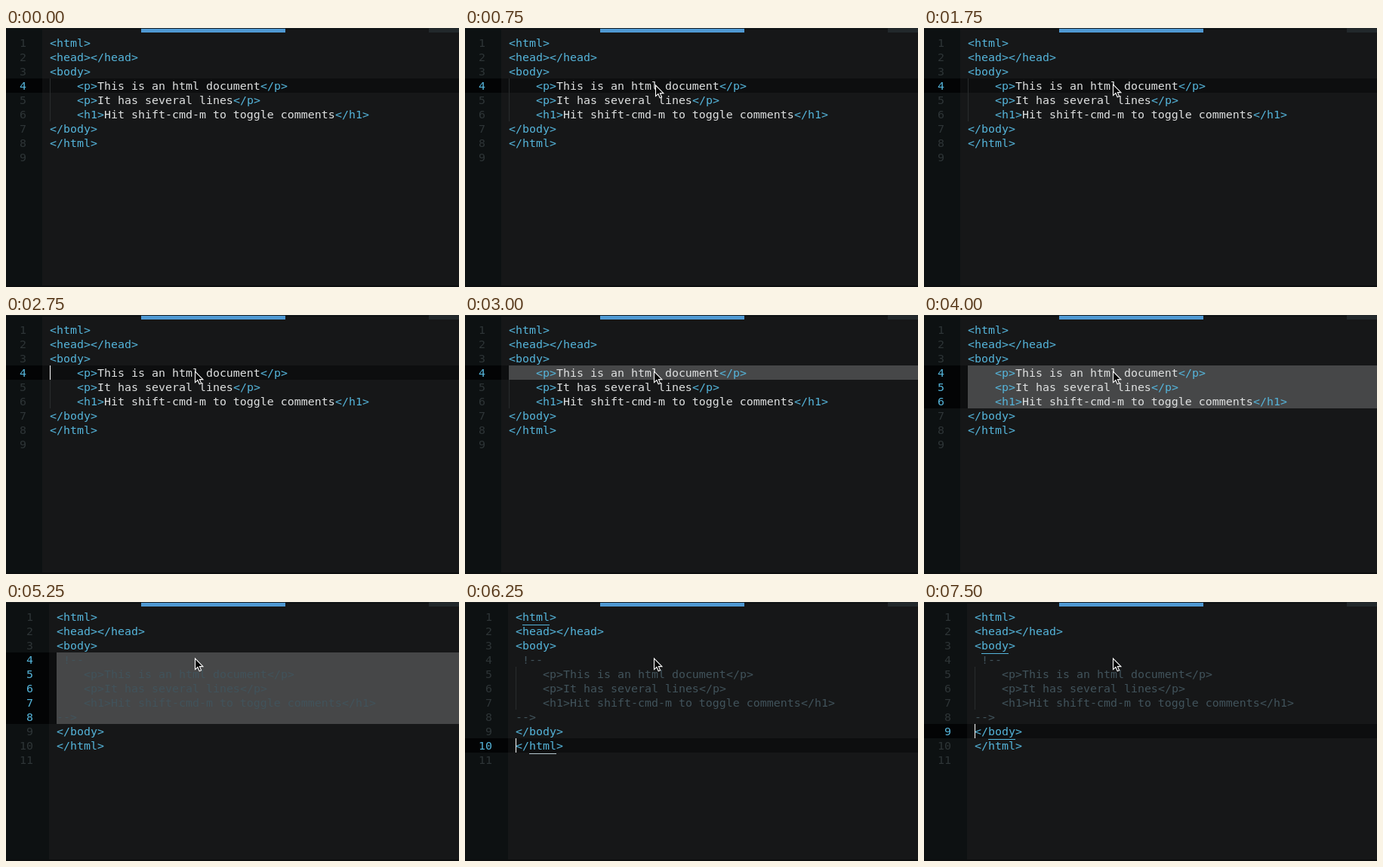
An HTML page with a canvas that plays this animation: 600x344 px, repeating every 8000 ms.

```html
<!DOCTYPE html>
<html lang="en">
<head>
<meta charset="utf-8">
<title>Toggle comments</title>
<style>
  html, body { margin: 0; width: 100%; height: 100%; overflow: hidden; background: #161718; }
  canvas { display: block; }
</style>
</head>
<body>
<canvas width="600" height="344"></canvas>
<script>
const ctx = document.querySelector('canvas').getContext('2d');
const LOOP = 8000, ROW = 19, CHAR = 9, TOP = 10;
const BLUE = '#55b5db', WHITE = '#dfe1e1', COMMENT = '#41535b';

const inner = [
  '    <p>This is an html document</p>',
  '    <p>It has several lines</p>',
  '    <h1>Hit shift-cmd-m to toggle comments</h1>'
];
const head = ['<html>', '<head></head>', '<body>'];
const tail = ['</body>', '</html>', ''];
const plain = [...head, ...inner, ...tail];
const commented = [...head, '<!--', ...inner, '-->', ...tail];

// Mouse positions as [time, x, y]
const mousePath = [[250, 297.5, 43], [500, 262.5, 58], [750, 252.5, 76], [1000, 250.5, 75]];
const arrow = new Path2D('M0 0V14.6L3.4 11.5L5.7 16.8L8.1 15.8L5.9 10.6H10.4Z');

// Times at which the caret toggles; it starts hidden
const blinks = [1250, 1750, 2000, 2500, 2750, 3000, 6250, 6750, 7000];

const rowTop = row => TOP + (row - 1) * ROW;

function box(color, x, y, w, h) {
  ctx.fillStyle = color;
  ctx.fillRect(x, y, w, h);
}

function text(string, x, row, color) {
  ctx.fillStyle = color;
  ctx.fillText(string, x, rowTop(row) + 15);
}

function drawLine(line, row, x, isComment) {
  for (const part of line.matchAll(/<[^>]*>|[^<]+/g)) {
    const color = isComment ? COMMENT : part[0][0] === '<' ? BLUE : WHITE;
    text(part[0], x + part.index * CHAR, row, color);
  }
}

function stateAt(t) {
  if (t < 3000) return { first: 4, last: 4 };
  if (t < 5250) return { first: 4, last: t < 3500 ? 4 : t < 4000 ? 5 : 6, selected: true };
  if (t < 6250) return { first: 4, last: 8, selected: true };
  return t < 7500
    ? { first: 10, last: 10, pair: [1, 10], closeColor: '#b5c6ce' }
    : { first: 9, last: 9, pair: [3, 9], closeColor: BLUE };
}

function draw(t) {
  const isCommented = t >= 5250;
  const lines = isCommented ? commented : plain;
  const gutter = isCommented ? 57 : 48;
  const left = gutter + 10;
  const { first, last, selected, pair, closeColor } = stateAt(t);

  box('#161718', 0, 0, 600, 344);
  box('#0d1112', 0, 0, gutter, 344);

  // Window edges and tabs
  box('#1b2022', 0, 0, 600, 1);
  box('#0b0d0e', 0, 1, 600, 1);
  box('#22282b', 560, 0, 40, 6);
  box('#4f99d3', 179, 1, 191, 5);
  box('#0c0e0f', 0, 342, 600, 2);

  const y = rowTop(first), height = (last - first + 1) * ROW;
  box('#0d0e0f', 0, y, 600, height);
  box('#030405', 0, y, gutter, height);

  lines.forEach((line, i) => {
    if (line[0] === ' ') box('#292c2d', left, rowTop(i + 1), 1, ROW);
  });
  if (selected) box('#464748', left, y, 600 - left, height);

  lines.forEach((line, i) => {
    const row = i + 1;
    const active = row >= first && row <= last;
    const number = String(row);
    text(number, gutter - 21 - number.length * CHAR, row, active ? BLUE : '#2e3537');
    drawLine(line, row, left, isCommented && row >= 4 && row <= 8);
  });

  if (pair) {
    box(BLUE, left + CHAR, rowTop(pair[0]) + 20, 4 * CHAR, 1);
    box(closeColor, left + 2 * CHAR, rowTop(pair[1]) + 20, 4 * CHAR, 1);
  }
  if (blinks.filter(time => t >= time).length % 2) box('#fff', left, y, 1, ROW);

  const mouse = mousePath.filter(([time]) => t >= time).pop();
  if (mouse) {
    ctx.save();
    ctx.translate(mouse[1], mouse[2]);
    ctx.fillStyle = '#000';
    ctx.strokeStyle = '#fff';
    ctx.lineWidth = 1.1;
    ctx.fill(arrow);
    ctx.stroke(arrow);
    ctx.restore();
  }
}

ctx.font = '14.95px "DejaVu Sans Mono", monospace';

function tick() {
  draw(performance.now() % LOOP);
  requestAnimationFrame(tick);
}
tick();
</script>
</body>
</html>
```
